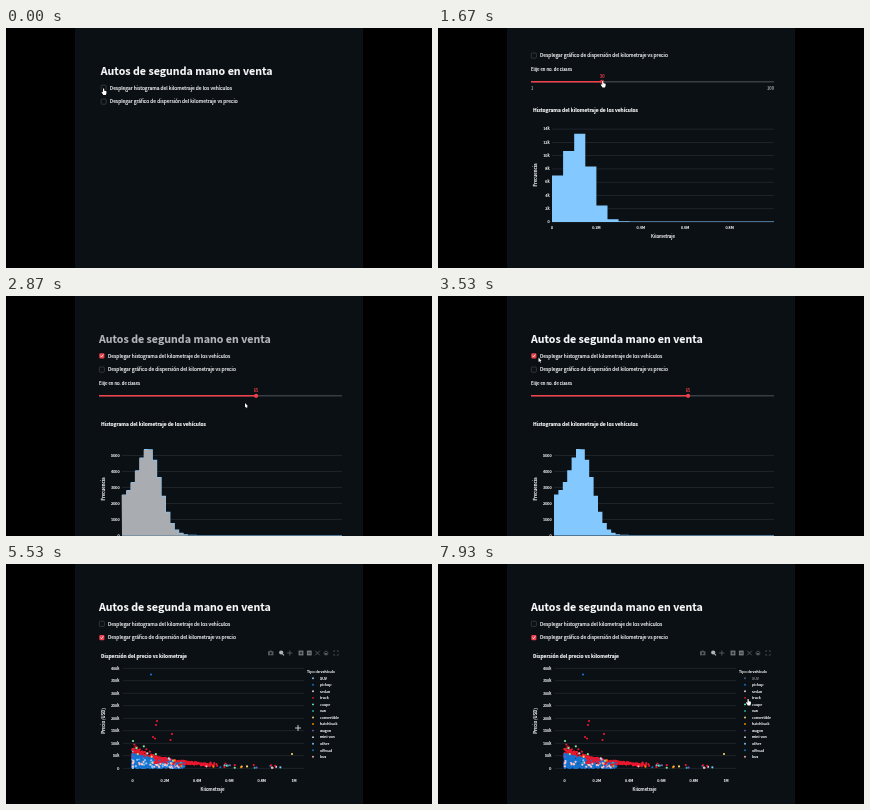
Animation of 426 by 240 pixels, one loop 8 s. Source, as an HTML page with a canvas:

```html
<!DOCTYPE html>
<html lang="es">
<head>
<meta charset="utf-8">
<style>
html, body { margin: 0; height: 100%; overflow: hidden; background: #000; }
canvas { display: block; width: 426px; height: 240px; }
</style>
</head>
<body>
<canvas id="stage" width="426" height="240"></canvas>
<script>
const ctx = document.getElementById('stage').getContext('2d');
const LOOP = 8000;
const FONT = '"Noto Sans CJK JP", "Noto Sans CJK SC", "Noto Sans CJK", "Noto Sans", sans-serif';
const PAGE = '#0b1014', WHITE = '#f8f9fa', RED = '#f0404c', BLUE = '#83c9ff', GRID = '#252c33';

// Each click on a checkbox shows at once, its chart follows after the server's reply
const TIME = {
  histCheck: 100, histShow: 600, scroll: 1470, drag: 1730, release: 2400, rebin: 2730, fresh: 3000,
  histUncheck: 3670, histHide: 4100, scatterCheck: 4530, scatterShow: 4930, hover: 5100, hideSuv: 6400
};
const TYPES = [
  ['SUV', '#83c9ff'], ['pickup', '#1673d2'], ['sedan', '#ffc4c0'], ['truck', '#e8182f'],
  ['coupe', '#7defa1'], ['van', '#29b09d'], ['convertible', '#ffd16a'], ['hatchback', '#ff8700'],
  ['wagon', '#7d55c8'], ['mini-van', '#d5dae5'], ['other', '#83c9ff'], ['offroad', '#1673d2'], ['bus', '#ffabab']
];

// Cursor stops: [arrive, leave, x, y]
const STOPS = [
  [0, 600, 97, 60.5], [960, 1470, 163.5, 97], [2870, 2950, 239, 107], [3600, 3950, 96, 60],
  [4180, 4250, 91, 86], [4480, 4930, 97, 73], [5500, 5700, 292, 164],
  [6250, 6700, 309, 113], [7000, 7400, 309, 120], [7800, 8000, 309.5, 135]
];

const ease = (t, from, to) => {
  const p = Math.min(1, Math.max(0, (t - from) / (to - from)));
  return p * p * (3 - 2 * p);
};
const mix = (a, b, p) => a + (b - a) * p;
const within = (t, from, to) => t >= from && t < to;

function scrollAt(t) {
  if (t < TIME.rebin) return 46 * ease(t, TIME.scroll, TIME.scroll + 200);
  return within(t, 3130, 3470) ? 46 : 0;
}

const sliderValue = t => mix(30, 62, ease(t, TIME.drag, 2220)) + 3 * ease(t, 2270, TIME.release);
const sliderX = value => 93 + 243 * (value - 1) / 99;

function cursorAt(t) {
  if (within(t, TIME.scroll, TIME.release)) {
    return [sliderX(sliderValue(t)) + (t < TIME.drag ? 0 : 1), 99 - scrollAt(t)];
  }
  const next = STOPS.findIndex(stop => t < stop[1]);
  const [arrive, , x, y] = STOPS[next];
  if (t >= arrive) return [x, y];
  let [, leave, fromX, fromY] = STOPS[next - 1];
  if (t >= TIME.release && leave === TIME.scroll) [leave, fromX, fromY] = [TIME.release, 251, 53];
  const p = ease(t, leave, arrive);
  return [mix(fromX, x, p), mix(fromY, y, p)];
}

function cursorKind(t) {
  if (within(t, TIME.hover, 6100)) return 'cross';
  return within(t, 2480, 3560) || within(t, 4040, 4450) ? 'arrow' : 'hand';
}

function rect(x, y, w, h, color) {
  ctx.fillStyle = color;
  ctx.fillRect(x, y, w, h);
}

function dot(x, y, r, color) {
  ctx.fillStyle = color;
  ctx.beginPath();
  ctx.arc(x, y, r, 0, 7);
  ctx.fill();
}

function line(points, color, width = 0.6) {
  ctx.strokeStyle = color;
  ctx.lineWidth = width;
  ctx.beginPath();
  points.forEach(([x, y]) => ctx.lineTo(x, y));
  ctx.stroke();
}

// Laid out at ten times the size so that small glyphs keep fractional widths
function text(str, x, y, size, { color = WHITE, align = 'left', weight = 400, turn = 0 } = {}) {
  ctx.save();
  ctx.translate(x, y);
  ctx.rotate(turn);
  ctx.scale(0.1, 0.1);
  ctx.font = `${weight} ${size * 10}px ${FONT}`;
  ctx.textAlign = align;
  ctx.fillStyle = ctx.strokeStyle = color;
  ctx.lineWidth = 1.6;
  ctx.lineJoin = 'round';
  ctx.fillText(str, 0, 0);
  ctx.strokeText(str, 0, 0);
  ctx.restore();
}

function checkbox(x, y, label, checked) {
  ctx.beginPath();
  ctx.roundRect(x + 0.3, y - 2.6, 5.1, 5.2, 1);
  if (checked) {
    ctx.fillStyle = RED;
    ctx.fill();
    line([[x + 1.5, y], [x + 2.5, y + 1.1], [x + 4.3, y - 1.2]], '#fff', 0.8);
  } else {
    ctx.strokeStyle = '#41464d';
    ctx.lineWidth = 0.7;
    ctx.stroke();
  }
  text(label, x + 9, y + 1.8, 4.89);
}

function slider(value, showLimits) {
  const x = sliderX(value), gray = '#a3a8b0';
  text('Elije en no. de clases', 93, 89, 4.3);
  rect(93, 99, 243, 1.5, '#383d44');
  rect(93, 99, x - 93, 1.5, RED);
  dot(x, 99.8, 2.1, RED);
  text(Math.round(value), x, 95.8, 4.2, { color: RED, align: 'center' });
  if (showLimits) {
    text('1', 93, 108.3, 4.2, { color: gray });
    text('100', 336, 108.3, 4.2, { color: gray, align: 'right' });
  }
}

function yAxis(count, label, zero, step, left, right, labelX) {
  for (let i = 0; i < count; i++) {
    const y = zero - i * step;
    rect(left, y - 0.3, right - left, 0.7, GRID);
    text(i ? label(i) : '0', labelX, y + 1.3, 3.8, { align: 'right' });
  }
}

function xAxis(count, zero, step, y) {
  for (let i = 0; i < count; i++) {
    const label = i === 0 ? '0' : i === 5 ? '1M' : `0.${i * 2}M`;
    text(label, zero + i * step, y, 3.8, { align: 'center' });
  }
}

// Thousands of cars per 0.02M of mileage, a skewed bell around 0.12M
function density(km) {
  const d = km - 0.12;
  const floor = d < 0 ? 2.4 : 0.03, sigma = d < 0 ? 0.045 : 0.055;
  return floor + (5.5 - floor) * Math.exp(-d * d / (2 * sigma * sigma));
}

function barValue(start, width) {
  let sum = 0;
  for (let i = 0; i < 10; i++) sum += density(start + width * (i + 0.5) / 10);
  return sum / 10 * width / 0.02;
}

function bars(left, zero, binWidth, unit, inset, color) {
  ctx.beginPath();
  ctx.moveTo(left, zero);
  for (let km = 0; km < 0.999; km += binWidth) {
    const y = Math.min(zero, zero - barValue(km, binWidth) * unit + inset);
    ctx.lineTo(left + km * (336 - left) - inset / 2, y);
    ctx.lineTo(left + (km + binWidth) * (336 - left) - inset / 2, y);
  }
  ctx.lineTo(336, zero);
  ctx.fillStyle = color;
  ctx.fill();
}

function histogram(fine, stale) {
  text('Histograma del kilometraje de los vehículos', 95, 129.8, 4.9, { weight: 700 });
  text('Frecuencia', 98.5, 193, 4.5, { align: 'center', turn: -Math.PI / 2 });
  const left = fine ? 116 : 114, zero = fine ? 239.4 : 240;
  if (fine) {
    yAxis(6, i => i * 1000, zero, 16, left, 336, 113.5);
    bars(left, zero, 0.02, 16, 0, BLUE);
    if (stale) bars(left, zero, 0.02, 16, 0.7, '#a9adb1');
  } else {
    yAxis(8, i => `${i * 2}k`, zero, 13.28, left, 336, 111.5);
    bars(left, zero, 0.05, 6.65, 0, BLUE);
  }
  xAxis(5, left, (336 - left) / 5, 246.8);
  text('Kilometraje', 225, 255.6, 4.4, { align: 'center' });
}

function makePoints() {
  let seed = 42;
  const random = () => (seed = seed * 16807 % 2147483647) / 2147483647;
  const list = [];
  const cloud = (type, count, from, to, low, high) => {
    for (let i = 0; i < count; i++) {
      const dx = mix(from, to, random() ** 1.5);
      const envelope = 18 * Math.exp(-dx / 42) + 1.5;
      list.push([type, 126.5 + dx, 204 - envelope * mix(low, high, random())]);
    }
  };
  cloud(0, 150, 0, 40, 0, 0.9);
  cloud(3, 230, 0, 75, 0.65, 1.05);
  cloud(1, 520, 0, 52, 0, 0.75);
  cloud(0, 22, 0, 45, 0, 0.6);
  cloud(2, 26, 0, 50, 0, 0.5);
  cloud(3, 90, 22, 85, 0.4, 1);
  for (let type = 4; type < 13; type++) {
    cloud(type, 2, 0, 50, 0.1, 1.1);
    cloud(type, 2, 70, 150, 0, 1);
  }
  cloud(3, 8, 75, 150, 0, 1.4);
  cloud(3, 9, 0, 22, 1.05, 1.3);
  cloud(4, 3, 0, 25, 1.1, 1.5);
  for (const [x, y] of [[151, 157], [150, 161], [147, 173], [149, 174.5], [166, 170], [164.5, 176]]) list.push([3, x, y]);
  list.push([1, 145, 110.5], [6, 286, 190], [4, 127, 177]);
  return list;
}
const POINTS = makePoints();

function toolbar() {
  const gray = '#555b61', y = 89;
  rect(262, y - 1.7, 5.4, 4, gray);
  rect(263.5, y - 2.4, 2.4, 1, gray);
  dot(264.7, y + 0.3, 1.1, PAGE);
  dot(275.2, y - 0.5, 2.1, '#b0b4b8');
  line([[276, y + 0.4], [278, y + 2.4]], '#b0b4b8', 1.1);
  line([[281.2, y], [286.4, y]], gray, 0.9);
  line([[283.8, y - 2.6], [283.8, y + 2.6]], gray, 0.9);
  [295, 303.3].forEach((x, i) => {
    rect(x - 2.4, y - 2.4, 4.8, 4.8, '#747a80');
    line([[x - 1.4, y], [x + 1.4, y]], PAGE, 0.8);
    if (!i) line([[x, y - 1.4], [x, y + 1.4]], PAGE, 0.8);
  });
  for (const s of [-1, 1]) line([[311.5 - 2.3, y - 2.3 * s], [311.5 + 2.3, y + 2.3 * s]], gray, 0.9);
  line([[317.5, y + 0.2], [320, y - 2.2], [322.5, y + 0.2]], gray, 0.9);
  rect(318.4, y, 3.2, 2.2, gray);
  for (const sx of [-1, 1]) for (const sy of [-1, 1]) {
    line([[330 + sx * 0.9, y + sy * 2.2], [330 + sx * 2.2, y + sy * 2.2], [330 + sx * 2.2, y + sy * 0.9]], gray, 0.7);
  }
}

function scatter(hideSuv, hovered) {
  text('Dispersión del precio vs kilometraje', 95, 93.7, 4.9, { weight: 700 });
  text('Precio (USD)', 98.5, 157, 4.4, { align: 'center', turn: -Math.PI / 2 });
  text('Kilometraje', 206.5, 226.7, 4.4, { align: 'center' });
  yAxis(9, i => `${i * 50}k`, 204.2, 12.5, 117, 298, 113.3);
  xAxis(6, 126.5, 32.3, 217.7);
  for (const [type, x, y] of POINTS) if (type || !hideSuv) dot(x, y, 1.1, TYPES[type][1]);
  text('Tipo de vehículo', 301, 108.9, 3.65);
  TYPES.forEach(([name, color], i) => {
    const y = 114.2 + i * 6.55;
    ctx.globalAlpha = hideSuv && !i ? 0.45 : 1;
    dot(307, y, 0.95, color);
    text(name, 314, y + 1.3, 3.6);
    ctx.globalAlpha = 1;
  });
  if (hovered) toolbar();
}

function cursor([x, y], kind) {
  if (kind === 'cross') {
    line([[x - 3, y], [x + 3, y]], '#d8dadc', 0.9);
    line([[x, y - 3], [x, y + 3]], '#d8dadc', 0.9);
    return;
  }
  const shape = kind === 'hand'
    ? [[0, 0], [1.1, 0], [1.3, 2.2], [3.5, 2.8], [3.4, 5], [2.8, 6.4], [0.3, 6.4], [-1.5, 3.7], [-0.9, 3.1], [0, 3.9]]
    : [[0, 0], [0, 4.5], [1, 3.7], [1.7, 5.2], [2.4, 4.9], [1.8, 3.4], [3.1, 3.3]];
  ctx.beginPath();
  shape.forEach(([dx, dy]) => ctx.lineTo(x + dx, y + dy));
  ctx.closePath();
  ctx.strokeStyle = '#000';
  ctx.lineWidth = 0.8;
  ctx.stroke();
  ctx.fillStyle = '#fff';
  ctx.fill();
}

function draw(t) {
  const histOn = within(t, TIME.histShow, TIME.histHide);
  const scatterOn = t >= TIME.scatterShow;
  const stale = within(t, TIME.rebin, TIME.fresh);
  const left = histOn || scatterOn ? 93 : 94.8;

  rect(0, 0, 426, 240, '#000');
  rect(69, 0, 288, 240, PAGE);
  ctx.save();
  ctx.beginPath();
  ctx.rect(69, 17, 288, 223);
  ctx.clip();
  ctx.translate(0, -scrollAt(t));
  text('Autos de segunda mano en venta', left, 47, 10.64, { weight: 700, color: stale ? '#b4b6b9' : WHITE });
  checkbox(left, 59.8, 'Desplegar histograma del kilometraje de los vehículos', within(t, TIME.histCheck, TIME.histUncheck));
  checkbox(left, 73.6, 'Desplegar gráfico de dispersión del kilometraje vs precio', t >= TIME.scatterCheck);
  if (histOn) {
    slider(sliderValue(t), t < TIME.rebin);
    histogram(t >= TIME.rebin, stale);
  }
  if (scatterOn) scatter(t >= TIME.hideSuv, t >= TIME.hover);
  ctx.restore();
  cursor(cursorAt(t), cursorKind(t));
}

function frame() {
  draw(performance.now() % LOOP);
  requestAnimationFrame(frame);
}
frame();
</script>
</body>
</html>
```
